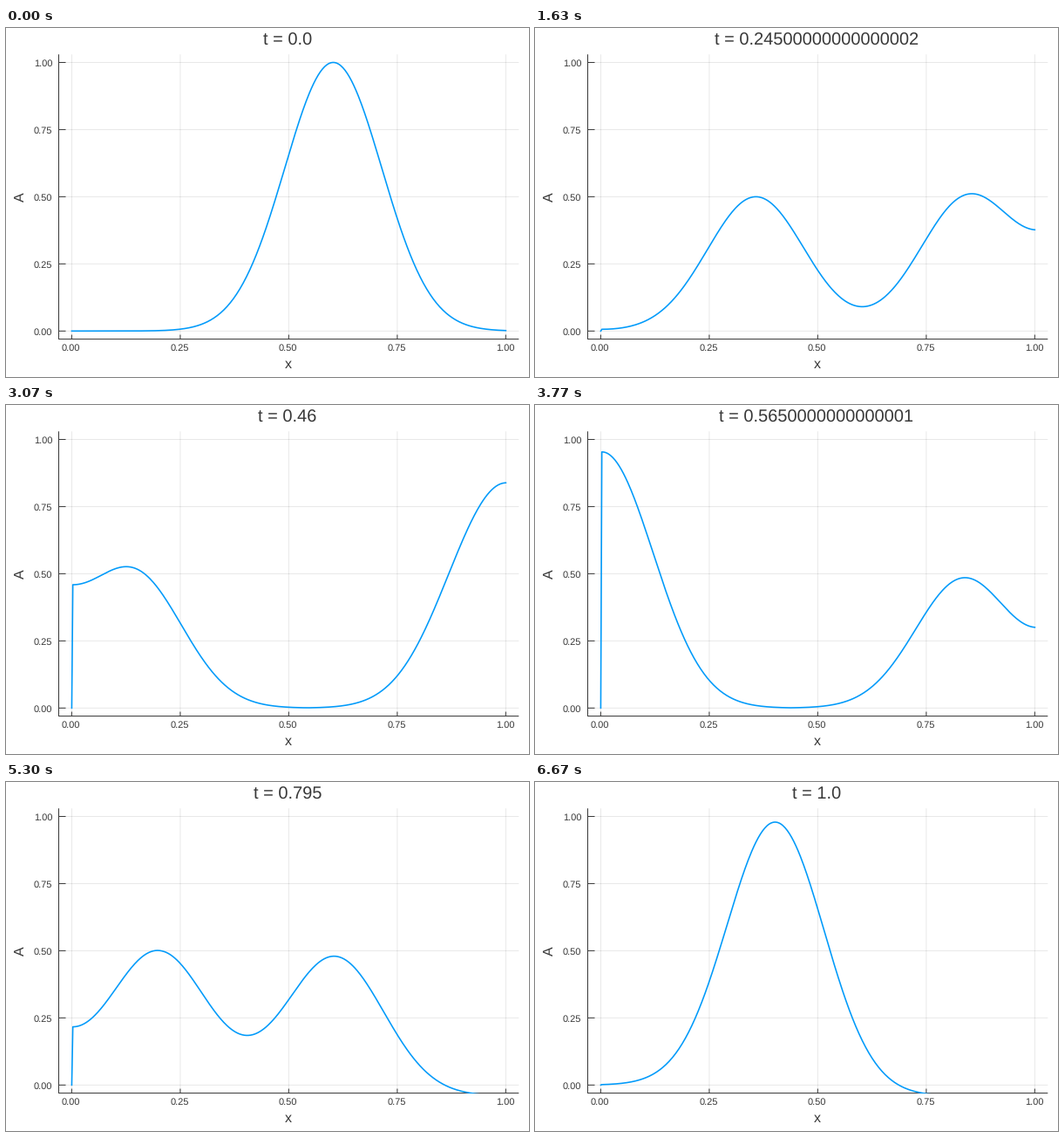
A matplotlib script for the animation above (6710 ms loop, 600 px wide and 400 px high).

```python
import math

import matplotlib.pyplot as plt
import numpy as np
from matplotlib.animation import FuncAnimation
from matplotlib.patches import Rectangle

W, H, DPI = 600, 400, 100
LOOP_MS, TICK_MS = 6710, 10     # pictures change on a 10 ms clock
FPS, LAST = 30, 200
DT, STEPS = 1e-4, 50            # solver step, steps per picture

LEFT, RIGHT, TOP, BOTTOM = 60.5, 588.3, 30.25, 356.55
LOW, HIGH = -0.03, 1.03
INK, BLUE = "#383838", "#009afa"

CENTER, SHARP = 0.6025, 40      # initial pulse exp(-SHARP (x - CENTER)^2)
WALL_L, WALL_R = 0.003, 1.003
LOSS, DECAY = 0.0425, 0.15      # dip left behind by the leaky right wall

plt.rcParams.update({"font.family": "Liberation Sans", "text.hinting": "none",
                     "text.hinting_factor": 1})
erf = np.vectorize(math.erf)
x = np.linspace(0, 1, 401)


def pt(px):
    return px * 72 / DPI


def to_x(v):
    return LEFT + (RIGHT - LEFT) * (v - LOW) / (HIGH - LOW)


def to_y(v):
    return BOTTOM + (TOP - BOTTOM) * (v - LOW) / (HIGH - LOW)


def pulse(s):
    """Initial profile, mirrored at both walls."""
    s = WALL_R - np.abs(WALL_R - s)
    s = WALL_L + np.abs(s - WALL_L)
    return np.exp(-SHARP * (s - CENTER) ** 2)


def wave(t):
    behind = x + t + CENTER - 2 * WALL_R
    dip = LOSS / 2 * (1 + erf(behind * math.sqrt(SHARP))) * np.exp(-DECAY * behind)
    a = (pulse(x - t) + pulse(x + t)) / 2 - dip
    a[0] = 0
    return a


# One canvas-wide axes measured in pixels, y downwards
fig = plt.figure(figsize=(W / DPI, H / DPI), dpi=DPI, facecolor="white")
ax = fig.add_axes([0, 0, 1, 1])
ax.set(xlim=(0, W), ylim=(H, 0))
ax.axis("off")


def rule(xs, ys, **kw):
    ax.plot(xs, ys, lw=pt(1), solid_capstyle="butt", snap=False, **kw)


def label(px, py, text, size, ha="center", va="baseline", **kw):
    return ax.text(px, py, text, fontsize=pt(size), color=INK, ha=ha, va=va, **kw)


for v in np.linspace(0, 1, 5):
    px, py = to_x(v), to_y(v)
    rule([px, px], [TOP, BOTTOM], color="black", alpha=0.09)
    rule([LEFT, RIGHT], [py, py], color="black", alpha=0.09)
    rule([px, px], [BOTTOM, BOTTOM - 5], color=INK)
    rule([LEFT, LEFT + 8], [py, py], color=INK)
    label(px - 0.8, 370, f"{v:.2f}", 10.6)
    label(53.2, py + 4.2, f"{v:.2f}", 10.6, ha="right")
rule([LEFT, LEFT, RIGHT], [TOP, BOTTOM, BOTTOM], color=INK)
label(324, 389.6, "x", 15.6)
label(24.6, 193.5, "A", 15.6, ha="right", va="center", rotation=90)
title = label(323, 19.8, "", 19.8)

line, = ax.plot([], [], color=BLUE, lw=pt(1.6), solid_joinstyle="round", zorder=3)
line.set_clip_path(Rectangle((LEFT, TOP), RIGHT - LEFT, BOTTOM - TOP,
                             transform=ax.transData))


def draw(i):
    # picture whose rounded start time has been reached
    k = min(int((i + 0.5) * TICK_MS * FPS / 1000), LAST)
    t = k * STEPS * DT
    line.set_data(to_x(x), to_y(wave(t)))
    title.set_text(f"t = {t}")
    return line, title


anim = FuncAnimation(fig, draw, frames=LOOP_MS // TICK_MS, interval=TICK_MS,
                     init_func=lambda: draw(0), repeat=True, repeat_delay=0)
plt.show()
```
